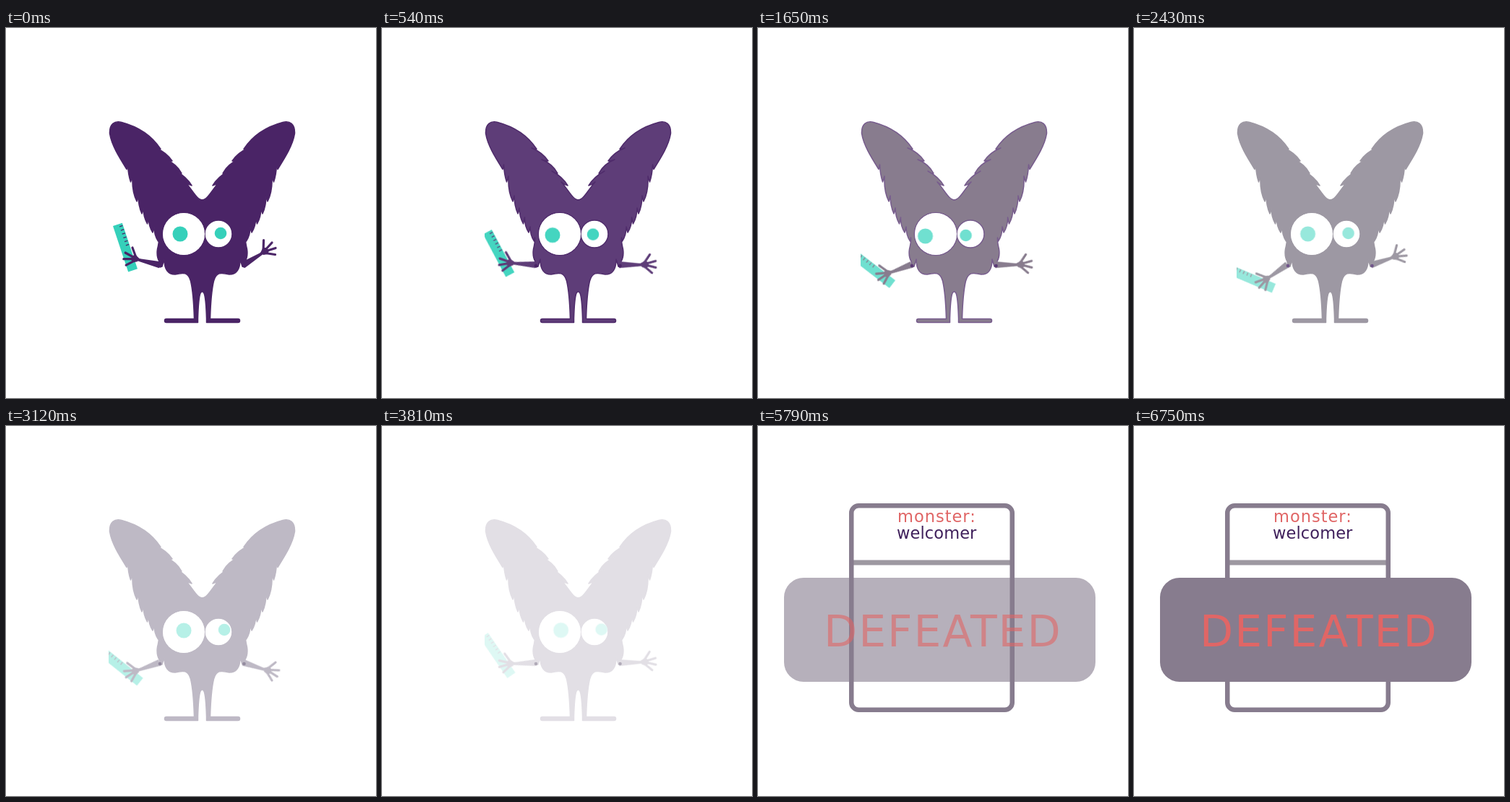
These frames come from a looping animation (512 px wide and 512 px high, 8380 ms). An HTML page:

```html
<!DOCTYPE html>
<html lang="en">
<head>
<meta charset="utf-8">
<title>Monster defeated</title>
<style>
  html, body { margin: 0; width: 100%; height: 100%; overflow: hidden; background: #fff; }
  svg { display: block; width: 100%; height: 100%; }
  text { font-family: "DejaVu Sans", Verdana, sans-serif; }

  .monster, .edge, .teal, .joint, .wave, .measure, .look, .card, .banner {
    animation: 8.38s linear infinite;
  }

  /* Monster fades out over the first 4380 ms */
  .monster { animation-name: skin, leave; }
  .skin { fill: currentColor; }
  .edge { stroke-width: 1.5; stroke-linejoin: round; animation-name: edge; }
  .teal { animation-name: teal; }
  .joint { animation-name: joint; }
  .limb { fill: none; stroke: currentColor; stroke-width: 3.2; stroke-linecap: round; }
  @keyframes skin {
    0% { color: #4a2466; } 12.17% { color: #6f5388; } 19.69% { color: #887c8e; }
    29% { color: #9d98a3; } 37.23% { color: #beb9c5; } 52.27%, 100% { color: #fff; }
  }
  @keyframes edge {
    0% { stroke: #4a2466; } 12.17% { stroke: #54316f; } 19.69% { stroke: #775c8d; }
    29% { stroke: #9d98a3; } 37.23% { stroke: #beb9c5; } 52.27%, 100% { stroke: #fff; }
  }
  @keyframes teal {
    0% { fill: #35d0ba; } 12.17% { fill: #52d9c5; } 19.69% { fill: #70e0d0; }
    29% { fill: #97e8dc; } 37.23% { fill: #b6f0e7; } 52.27%, 100% { fill: #fff; }
  }
  @keyframes joint {
    0%, 12.17% { fill: #4a2466; } 29% { fill: #70558a; }
    37.23% { fill: #938b9f; } 52.27%, 100% { fill: #c9c5cd; }
  }
  @keyframes leave { 0%, 52.26% { opacity: 1; } 52.27%, 100% { opacity: 0; } }

  .wave { transform-origin: 329px 328px; animation-name: wave; }
  @keyframes wave {
    0%, 26.13%, 52.27%, 100% { transform: rotate(0deg); }
    13.07% { transform: rotate(65deg); }
    39.2% { transform: rotate(59deg); }
  }
  .measure { transform-origin: 212px 328px; animation-name: measure; }
  @keyframes measure {
    0% { transform: rotate(0deg); } 12.17% { transform: rotate(-18deg); }
    19.69% { transform: rotate(-34deg); } 28.28% { transform: rotate(-50deg); }
    37.23% { transform: rotate(-33deg); } 52.27%, 100% { transform: rotate(-2deg); }
  }
  .look { animation-name: look; }
  @keyframes look {
    0% { transform: translate(0, 0); }
    12.17% { transform: translate(-9.5px, 3px); }
    15.93% { transform: translate(-10px, 3.2px); }
    19.69% { transform: translate(-9.5px, 3px); }
    29% { transform: translate(-.5px, 0); }
    37.23% { transform: translate(5px, -2px); }
    44% { transform: translate(8px, -3px); }
    52.27%, 100% { transform: translate(0, 0); }
  }

  /* Card, then the slower banner */
  .card { animation-name: card; }
  .banner { animation-name: banner; }
  @keyframes card { 0%, 51.91% { opacity: 0; } 64.44%, 100% { opacity: 1; } }
  @keyframes banner { 0%, 51.91% { opacity: 0; } 80.55%, 100% { opacity: 1; } }
</style>
</head>
<body>
<svg viewBox="0 0 512 512">
  <defs>
    <clipPath id="frame"><rect x="142" y="129" width="260" height="280"/></clipPath>
    <path id="half" class="skin" d="M272 238 C264 238 258 224 248 213 Q252 217 257 218
      Q250 206 235 198 Q239 201 243 201 Q236 188 221 182 Q225 184 230 184
      Q222 172 207 166 Q211 168 214 167.500 Q196 140 160 130.500 C150 128 143 133 143.500 146
      C146 162 156 178 167 195.500 L168.500 189 Q169 203 172.500 213 L175 205 Q174 226 181 240
      L183 232 Q183 246 188 257 L190 249 Q190 261 195.500 271 L197.500 262 Q197 274 203 283
      L205 275 Q205 287 210.500 295 L211.500 290 Q212 296 209.500 306 Q208 316 212 323 L213 331
      L216 330 L219 320 C219 335 224 341 234 341 C246 338 252 338 255.500 350
      C259 365 260 385 260.500 402.500 H222 a2.500 2.500 0 0 0 0 5 H265.500 V402
      C266 385 267 372 269 367 Q270.500 364.500 272 364.500"/>
    <g id="arm">
      <path class="skin" d="M326 324 L330.500 332 L355 313.500 L353 310.500 Z"/>
      <path class="limb" d="M352 313 L356 310 L356.500 293.500 M357 309 L368 297 M357 309.500 L373 304.500 M356 311 L372.500 313.500"/>
      <path class="skin" d="M352 311 L355.500 304 L360 304 L364 308 L362 313 L356 314 Z"/>
    </g>
  </defs>

  <g class="monster" clip-path="url(#frame)">
    <g class="edge">
      <use href="#half"/>
      <use href="#half" transform="translate(543 0) scale(-1 1)"/>
    </g>

    <g fill="#fff">
      <circle class="edge" cx="246" cy="285" r="29.500"/>
      <circle class="edge" cx="294" cy="285" r="19"/>
      <circle cx="246" cy="285" r="29"/>
    </g>
    <g class="look">
      <circle class="teal" cx="241" cy="285" r="10.500"/>
      <circle class="teal" cx="297" cy="284" r="8.300"/>
    </g>

    <g class="wave"><use href="#arm"/></g>
    <g class="measure">
      <g transform="translate(148 274) rotate(-18.400)">
        <rect class="teal" width="13.500" height="67"/>
        <path d="M10.700 3 V34" fill="none" stroke="currentColor" stroke-width="4.500" stroke-dasharray="1.300 4.200"/>
      </g>
      <use href="#arm" transform="rotate(-18.500 212 328) translate(541 0) scale(-1 1)"/>
    </g>
    <circle class="joint" cx="213" cy="329" r="2.300"/>
    <circle class="joint" cx="329.500" cy="329" r="2.300"/>
  </g>

  <g class="card">
    <path d="M132 189 H349" stroke="#9d98a1" stroke-width="7"/>
    <rect x="129.250" y="110.250" width="222.500" height="282.500" rx="10" fill="none" stroke="#877c8e" stroke-width="6.500"/>
    <text x="193" y="133" font-size="22.500" letter-spacing="1" fill="#e06666">monster:</text>
    <text x="192" y="156" font-size="22.500" letter-spacing=".1" fill="#40215c">welcomer</text>
  </g>

  <rect class="banner" x="36" y="210" width="431" height="144" rx="27" fill="#877c8e"/>
  <text class="banner" x="91" y="305" font-size="60" letter-spacing="2" fill="#e06666">DEFEATED</text>
</svg>
</body>
</html>
```
